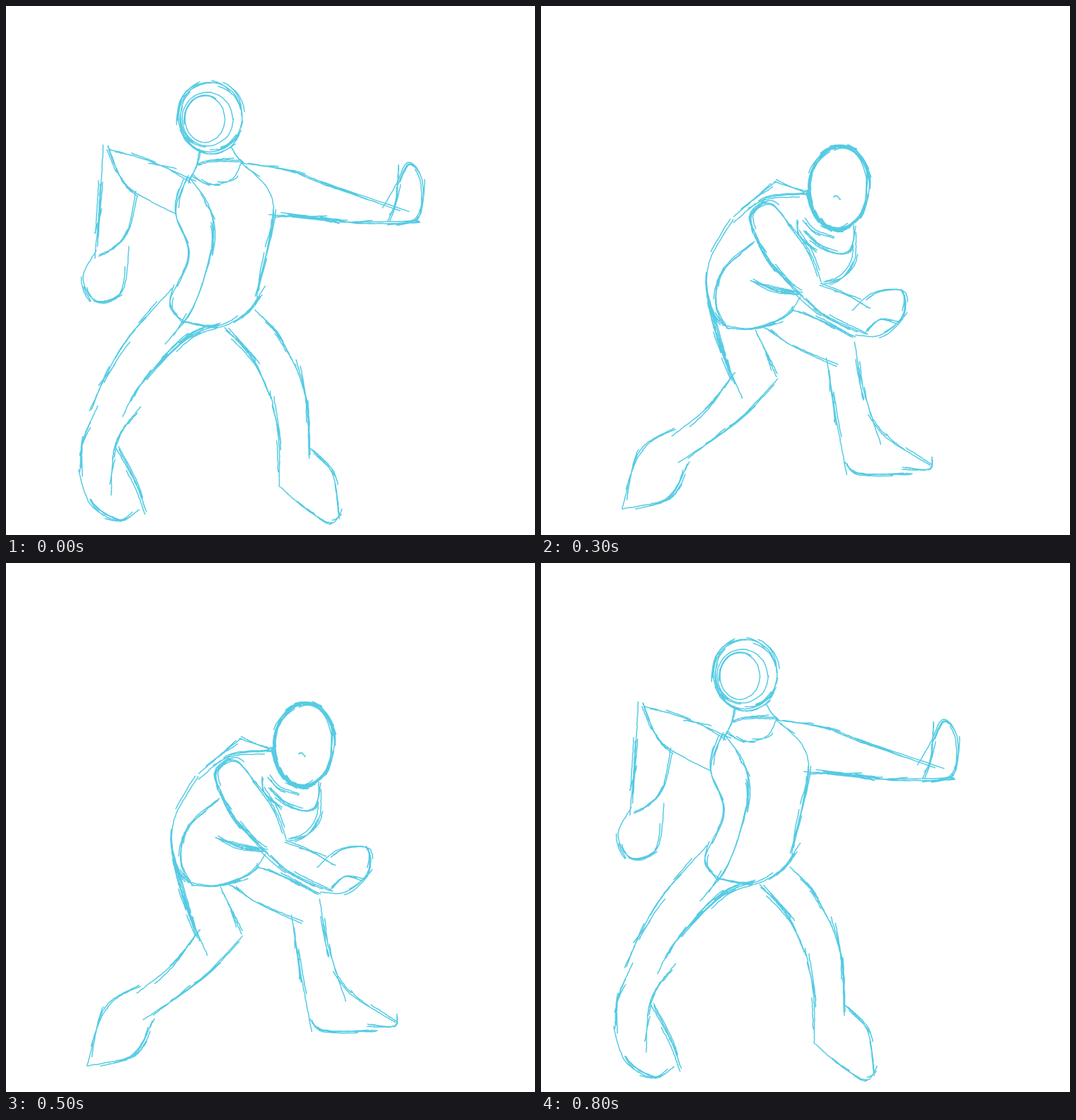
These frames come from a looping animation (748x748 px, 0.9 s). An HTML page:

```html
<!DOCTYPE html>
<html lang="en">
<head>
<meta charset="utf-8">
<title>Push pose</title>
<style>
html, body { margin: 0; width: 100%; height: 100%; overflow: hidden; background: #fff; }
svg { display: block; width: 100%; height: 100%; }
path { fill: none; stroke: #56cbe3; stroke-width: 1.5; stroke-linecap: round; stroke-linejoin: round; opacity: 0; }
</style>
</head>
<body>
<svg id="stage" viewBox="0 0 748 748"></svg>
<script>
// Each line runs smoothly through a few key points; "!" marks a heavily worked line.
const push = {
  head: ellipse(289, 157, 45, 49, 0, 3),
  face: ellipse(281, 160, 28, 33, 0, 0.3),
  brow: ellipse(285, 160, 36, 38, 0, 0.3),
  nape: line("275,206 270,226 258,247"),
  throat: line("319,200 326,212 336,222"),
  collar: line("262,240 280,250 300,252 322,243 333,222"),
  neckline: line("272,223 290,218 333,218"),
  backArmTop: line("145,202 205,220 268,248"),
  backArmUnder: line("144,198 162,242 185,265 240,294"),
  backForearmOut: line("137,197 134,260 126,357"),
  backForearmIn: line("183,262 172,318 150,344 132,354"),
  backHand: line("128,346 109,385 128,417 165,402 174,340"),
  back: line("258,240 240,290 258,352 232,420 255,448"),
  stripe: line("262,245 288,285 292,340 265,425 225,478"),
  front: line("334,222 370,258 378,300 360,382 352,410"),
  belly: line("250,446 300,454 340,433 366,396"),
  frontArmTop: line("333,222 400,232 450,250 570,291"),
  frontArmUnder: line("372,295 440,299 500,307 586,306!"),
  frontHand: line("532,285 550,255 568,221 588,245 584,298 540,310"),
  palm: line("540,305 551,276 555,226"),
  backThighOut: line("235,400 165,480 118,572"),
  backThighIn: line("300,452 255,470 190,535 165,580!"),
  backShinOut: line("130,565 109,615 108,665"),
  backShinIn: line("190,567 155,620 149,692"),
  heel: line("103,656 120,705 160,728 188,712"),
  instep: line("155,625 183,675 198,715"),
  frontThighOut: line("352,430 385,465 412,515"),
  frontThighIn: line("310,455 350,500 375,555!"),
  frontShinOut: line("410,500 425,560 429,640"),
  frontShinIn: line("373,545 385,610 386,680"),
  toeTop: line("430,625 462,662 472,725"),
  sole: line("388,680 425,712 460,731 475,712")
};

const lean = {
  head: ellipse(361, 151, 42, 51, 0.28, 5),
  nape: line("327,200 310,212 298,230"),
  throat: line("372,194 374,215 379,238"),
  collar: line("312,232 325,252 348,259 378,237"),
  neckline: line("302,215 340,216 372,206"),
  backArmTop: line("167,292 225,253 300,232"),
  backArmUnder: line("170,294 230,299 325,281"),
  backForearmOut: line("173,288 182,360 200,430"),
  backForearmIn: line("224,303 228,345 220,408"),
  backHand: line("190,405 212,465 228,474 246,458 230,375"),
  back: line("320,206 278,260 264,335 229,402!"),
  stripe: line("337,253 308,310 285,380 248,437!"),
  front: line("378,240 398,295 372,370 362,425"),
  belly: line("230,375 262,435 310,457 358,430"),
  frontArmTop: line("378,235 405,280 437,345"),
  frontArmUnder: line("388,340 420,373 465,390 512,383"),
  forearmTop: line("435,333 470,355 512,381"),
  cuff: line("437,345 420,355 398,349"),
  frontHand: line("485,356 505,350 535,320 540,340 510,384"),
  backThighOut: line("197,440 184,490 172,522"),
  backThighIn: line("262,450 248,495 230,540"),
  backShinOut: line("175,515 130,570 98,632"),
  backShinIn: line("227,530 185,580 145,625"),
  heel: line("105,610 83,675 104,718 123,735"),
  instep: line("146,625 150,665 138,718 123,730"),
  frontThighOut: line("350,437 380,485 402,540"),
  frontThighIn: line("270,445 315,485 340,533"),
  frontShinOut: line("402,525 408,580 424,635"),
  frontShinIn: line("318,497 360,580 374,630 378,672"),
  toeTop: line("412,605 450,640 494,672!"),
  sole: line("378,672 425,683 480,690 494,674")
};

const crouch = {
  head: ellipse(421, 257, 43, 59, 0.06, 8),
  nape: line("362,305 366,325 390,345"),
  throat: line("442,310 442,330 438,348"),
  collar: line("372,318 395,340 425,350 442,340"),
  neckline: line("370,303 385,318 414,328"),
  backArmTop: line("352,308 380,348 396,390"),
  backArmUnder: line("300,315 325,362 370,410!"),
  backForearmOut: line("360,402 400,436 460,464"),
  backForearmIn: line("396,392 430,406 463,427"),
  backHand: line("440,430 470,405 510,403 512,437 480,465 445,465"),
  back: line("272,302 237,365 240,430 265,456"),
  stripe: line("302,333 258,372 248,420 262,452"),
  front: line("445,320 443,360 425,385 398,394"),
  belly: line("262,455 300,456 345,440 367,412"),
  shoulder: line("300,318 298,292 325,279 354,313!"),
  upperBack: line("273,298 305,270 332,248"),
  yoke: line("330,248 350,255 376,263"),
  blade: line("272,306 318,272 376,266"),
  frontArmTop: line("296,388 330,397 370,405"),
  frontArmUnder: line("300,386 330,402 368,407"),
  knuckles: line("460,460 480,443 505,446"),
  backThighOut: line("236,408 250,470 270,530"),
  backThighIn: line("303,458 318,490 333,524"),
  hamstring: line("240,425 262,500 285,555"),
  backShinOut: line("275,518 235,568 185,608"),
  backShinIn: line("335,528 270,594 194,646"),
  heel: line("190,598 140,628 115,710"),
  instep: line("115,711 180,695 207,648"),
  frontThighOut: line("357,430 400,446 445,468"),
  frontThighIn: line("319,456 360,483 418,510"),
  frontShinOut: line("443,475 455,540 480,620"),
  frontShinIn: line("404,497 415,570 432,662"),
  toeTop: line("462,578 490,612 551,650"),
  sole: line("430,645 450,661 525,661"),
  toe: line("553,638 548,655 510,655"),
  nose: line("414,270 418,269 423,274")
};

function ellipse(cx, cy, rx, ry, tilt, density) {
  const points = Array.from({ length: 41 }, (_, i) => {
    const a = i / 40 * 2 * Math.PI;
    const [x, y] = [rx * Math.cos(a), ry * Math.sin(a)];
    return [cx + x * Math.cos(tilt) - y * Math.sin(tilt), cy + x * Math.sin(tilt) + y * Math.cos(tilt)];
  });
  return { density, points };
}

// Catmull-Rom curve through the key points.
function line(text) {
  const keys = text.replace("!", "").split(" ").map(p => p.split(",").map(Number));
  const last = keys.length - 1;
  const key = i => keys[Math.max(0, Math.min(last, i))];
  const points = Array.from({ length: 41 }, (_, n) => {
    const u = n / 40 * last;
    const i = Math.min(last - 1, Math.floor(u));
    const f = u - i;
    return [0, 1].map(axis => {
      const [a, b, c, d] = [-1, 0, 1, 2].map(k => key(i + k)[axis]);
      return b + f * (c - a + f * (2 * a - 5 * b + 4 * c - d + f * (3 * (b - c) + d - a))) / 2;
    });
  });
  return { density: text.endsWith("!") ? 3.5 : 1.5, points };
}

const lerp = (a, b, k) => a + (b - a) * k;

function seededRandom(seed) {
  return () => {
    seed = (seed * 1664525 + 1013904223) >>> 0;
    return seed / 4294967296;
  };
}

function between(from, to, k) {
  const shared = Object.keys(from).filter(name => name in to);
  return Object.fromEntries(shared.map(name => [name, {
    density: lerp(from[name].density, to[name].density, k),
    points: from[name].points.map((p, i) => p.map((v, axis) => lerp(v, to[name].points[i][axis], k)))
  }]));
}

// Sinks the upper body while the feet stay planted.
function sink(pose, dx, dy) {
  const move = ([x, y]) => {
    const k = Math.max(0, Math.min(1, (620 - y) / 250));
    return [x + dx * k, y + dy * k];
  };
  return Object.fromEntries(Object.entries(pose).map(([name, { density, points }]) =>
    [name, { density, points: points.map(move) }]));
}

// Traces every line once, then goes over it with short, slightly misplaced strokes.
function sketch(pose, seed) {
  const random = seededRandom(seed);
  const wobble = size => (random() - 0.5) * 2 * size;
  let d = "";

  function trace(points, spread) {
    const [x0, y0, x1, y1] = Array.from({ length: 4 }, () => wobble(spread));
    points.forEach(([x, y], i) => {
      const k = i / (points.length - 1);
      const px = x + lerp(x0, x1, k) + wobble(0.4);
      const py = y + lerp(y0, y1, k) + wobble(0.4);
      d += `${i ? "L" : "M"}${px.toFixed(1)} ${py.toFixed(1)}`;
    });
  }

  for (const { density, points } of Object.values(pose)) {
    trace(points, 0.5);
    const steps = points.length - 1;
    const length = points.slice(1).reduce((sum, [x, y], i) =>
      sum + Math.hypot(x - points[i][0], y - points[i][1]), 0);
    for (let n = Math.round(length / 50 * density); n > 0; n--) {
      const span = Math.max(2, Math.min(steps, Math.round(lerp(25, 80, random()) / length * steps)));
      const first = Math.floor(random() * (steps - span + 1));
      trace(points.slice(first, first + span + 1), 4);
    }
  }
  return d;
}

const poses = [push, lean, between(lean, crouch, 0.5), crouch, sink(crouch, 5, 9)];
const order = [0, 1, 2, 3, 4, 3, 2, 1, 0];

poses.forEach((pose, index) => {
  const path = document.createElementNS("http://www.w3.org/2000/svg", "path");
  path.setAttribute("d", sketch(pose, 17 + index));
  document.getElementById("stage").append(path);
  const frames = [...order, order[0]].map((shown, i) => ({
    opacity: shown === index ? 1 : 0,
    offset: i / order.length,
    easing: "steps(1, end)"
  }));
  path.animate(frames, { duration: 900, iterations: Infinity });
});
</script>
</body>
</html>
```
